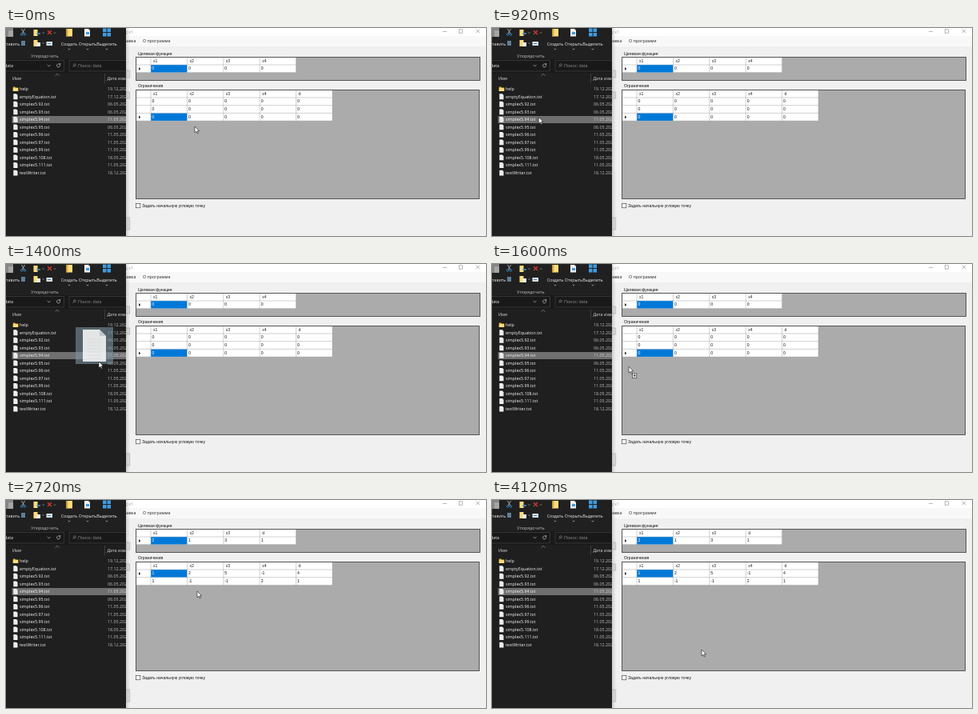
These frames come from a looping animation (600 by 260 pixels, 4360 ms). An HTML page with a canvas:

```html
<!DOCTYPE html>
<html lang="ru">
<head>
<meta charset="utf-8">
<style>
  html, body { margin: 0; width: 100%; height: 100%; overflow: hidden; background: #f0f0f0; }
  canvas { display: block; width: 600px; height: 260px; }
</style>
</head>
<body>
<canvas id="stage" width="600" height="260"></canvas>
<script>
const ctx = document.getElementById('stage').getContext('2d');
const LOOP = 4360, STEP = 40, DRAG = 1200, LOAD = 2720, EDGE = 150;
const UI = '5.3px "Open Sans", sans-serif';
const FORM = '5.15px "Liberation Sans", sans-serif';

const files = [
  ['help', '19.12.2020'], ['emptyEquation.txt', '17.12.2020'],
  ['simplex5.92.txt', '06.05.2020'], ['simplex5.93.txt', '06.05.2020'],
  ['simplex5.94.txt', '11.05.2020'], ['simplex5.95.txt', '06.05.2020'],
  ['simplex5.96.txt', '11.05.2020'], ['simplex5.97.txt', '11.05.2020'],
  ['simplex5.99.txt', '11.05.2020'], ['simplex5.108.txt', '18.05.2020'],
  ['simplex5.111.txt', '11.05.2020'], ['testWriter.txt', '18.12.2020']
];
const SELECTED = 4;

// time, x, y, eased
const cursorPath = [
  [0, 236, 123, 0], [560, 58, 110, 1], [640, 57, 109, 0], [1120, 59, 113, 1],
  [1240, 61, 115, 0], [1400, 116, 122, 0], [1720, 204, 132, 0], [2120, 239, 114, 1],
  [2720, 239, 114, 0], [3120, 265, 186, 1], [3360, 265, 186, 0], [3480, 262, 187, 0]
];

function pointAt(t) {
  const i = cursorPath.findIndex(k => k[0] > t);
  if (i < 0) return cursorPath[cursorPath.length - 1].slice(1, 3);
  const a = cursorPath[i - 1], b = cursorPath[i];
  let u = (t - a[0]) / (b[0] - a[0]);
  if (b[3]) u = u * u * (3 - 2 * u);
  return [a[1] + (b[1] - a[1]) * u, a[2] + (b[2] - a[2]) * u];
}

function box(x, y, w, h, fill, stroke, width = 0.6) {
  if (fill) { ctx.fillStyle = fill; ctx.fillRect(x, y, w, h); }
  if (stroke) { ctx.strokeStyle = stroke; ctx.lineWidth = width; ctx.strokeRect(x, y, w, h); }
}

function text(s, x, y, color, font = FORM, align = 'left') {
  ctx.font = font;
  ctx.textAlign = align;
  ctx.textBaseline = 'middle';
  ctx.fillStyle = color;
  ctx.fillText(s, x, font === UI ? y + 0.6 : y);
}

function trace(points, close) {
  ctx.beginPath();
  points.forEach(([x, y], i) => i ? ctx.lineTo(x, y) : ctx.moveTo(x, y));
  if (close) ctx.closePath();
}

function line(points, color, width = 0.6) {
  trace(points);
  ctx.strokeStyle = color;
  ctx.lineWidth = width;
  ctx.stroke();
}

function shape(points, fill) {
  trace(points, true);
  ctx.fillStyle = fill;
  ctx.fill();
}

function ring(x, y, r, color, from = 0, to = Math.PI * 2) {
  ctx.beginPath();
  ctx.arc(x, y, r, from, to);
  ctx.strokeStyle = color;
  ctx.lineWidth = 0.7;
  ctx.stroke();
}

function chevron(x, y, size, dir, color) {
  line([[x - size, y - dir * size / 2], [x, y + dir * size / 2], [x + size, y - dir * size / 2]], color, 0.7);
}

function sheet(x, y, w, h, fold, lineStep) {
  shape([[x, y], [x + w - fold, y], [x + w, y + fold], [x + w, y + h], [x, y + h]], '#f4f4f4');
  shape([[x + w - fold, y], [x + w, y + fold], [x + w - fold, y + fold]], '#bcc3c8');
  for (let ly = y + fold + lineStep; ly < y + h - 1; ly += lineStep)
    line([[x + w * 0.2, ly], [x + w * 0.8, ly]], '#c2c8cc', 0.4);
}

function folder(x, y, w, h) {
  shape([[x, y], [x + w * 0.4, y], [x + w * 0.5, y + h * 0.18], [x + w, y + h * 0.18], [x + w, y + h], [x, y + h]], '#e3ae37');
  box(x, y + h * 0.3, w, h * 0.7, '#ffdc7c');
}

function drawRibbon() {
  box(0, 0, EDGE, 39, '#202020');
  text('тавить', 0, 20, '#e8e8e8', UI);
  box(0, 0, 9, 11, '#858585');
  box(3, 3, 6, 8, '#a5a5a5');

  // scissors and shortcut
  line([[19.5, 1], [22.8, 7]], '#b9cbd8', 0.8);
  line([[23.5, 1], [20.2, 7]], '#b9cbd8', 0.8);
  ring(19.6, 8, 1.3, '#3f9be0');
  ring(23.4, 8, 1.3, '#3f9be0');
  box(19, 16, 5, 6, '#5d7f98');

  box(34.5, 2, 5, 8, '#ffdc7c');
  line([[38, 7], [43, 7]], '#3f9be0', 1.4);
  box(34.5, 15, 5, 8, '#ffdc7c');
  box(38.5, 18, 4.5, 5, '#e9eef2');
  line([[52, 3], [57, 8]], '#d63a30', 1.2);
  line([[57, 3], [52, 8]], '#d63a30', 1.2);
  box(50.5, 17, 7.5, 5, '#dfe5ea');
  line([[52, 19.5], [56, 19.5]], '#3f88c8', 1.2);
  for (const [x, y] of [[46.5, 6], [46.5, 19], [61, 6]]) chevron(x, y, 1.2, 1, '#b0b0b0');
  text('Упорядочить', 48.5, 35, '#bdbdbd', UI, 'center');

  box(75.5, 1, 7.5, 9.5, '#ffdc7c');
  box(75.5, 1, 2, 9.5, '#e3ae37');
  sheet(98, 1, 7, 9.5, 2, 2);
  box(100, 5, 4, 3, '#3f9be0');
  for (let i = 0; i < 4; i++)
    box(121 + (i % 2) * 5.5, 0.5 + (i >> 1) * 5.5, 4.5, 4.5, '#3f9be0');
  for (const [label, x] of [['Создать', 79], ['Открыть', 102], ['Выделить', 126]]) {
    text(label, x, 20, '#f0f0f0', UI, 'center');
    chevron(x, 26.5, 1.3, 1, '#c8c8c8');
  }
}

function drawAddress() {
  box(0, 39, EDGE, 17, '#191919');
  box(-2, 40.5, 74.5, 13.5, '#191919', '#484848');
  text('data', -2, 47, '#f2f2f2', UI);
  chevron(53.5, 47, 1.9, 1, '#c9c9c9');
  ring(65.5, 47, 2, '#c0c0c0', -0.3, 5.2);
  shape([[66, 44.2], [68.4, 44.4], [67.6, 46.4]], '#c0c0c0');
  box(79, 40.5, 80, 13.5, '#191919', '#484848');
  ring(85.8, 46.3, 1.4, '#909090');
  line([[84.8, 47.4], [83.4, 48.8]], '#909090');
  text('Поиск: data', 90, 47, '#8f8f8f', UI);
}

function drawExplorer() {
  ctx.save();
  ctx.beginPath();
  ctx.rect(0, 0, EDGE, 260);
  ctx.clip();
  box(0, 0, EDGE, 260, '#1f1f1f');
  drawRibbon();
  drawAddress();
  chevron(64, 58.5, 2.4, -1, '#959595');
  text('Имя', 8, 63, '#dedede', UI);
  line([[123.5, 57], [123.5, 69]], '#555', 0.6);
  text('Дата изменения', 126.5, 63, '#dedede', UI);
  files.forEach(([name, date], i) => {
    const y = 76.2 + i * 9.53;
    if (i === SELECTED) box(7.5, 110, EDGE, 9, '#6f6f6f');
    if (i) sheet(9.3, y - 3.4, 5.2, 6.8, 1.6, 1.5);
    else folder(8.8, y - 2.8, 6.4, 5.6);
    text(name, 17, y, '#f4f4f4', UI);
    text(date, 127, y, i === SELECTED ? '#d2d2d2' : '#bcbcbc', UI);
  });
  ctx.restore();
}

function drawGrid(x, y, w, h, heads, rows, active) {
  const left = x + 18.5, col = 45.4, headH = 9.5, rowH = 9.7;
  const right = left + col * heads.length, bottom = y + headH + rowH * rows.length;
  box(x, y, w, h, '#ababab');
  box(x, y, right - x, bottom - y, '#fff');
  for (let r = 0; r <= rows.length; r++) {
    const ly = y + headH + r * rowH;
    line([[x, ly], [right, ly]], '#a0a0a0', 0.5);
  }
  for (let c = 0; c <= heads.length; c++)
    line([[left + c * col, y], [left + c * col, bottom]], '#a0a0a0', 0.5);
  heads.forEach((s, c) => text(s, left + c * col + 3, y + 4.9, '#222'));
  rows.forEach((row, r) => {
    const top = y + headH + r * rowH;
    row.forEach((v, c) => {
      const on = r === active && c === 0;
      if (on) box(left + 0.2, top + 0.2, col - 0.4, rowH - 0.4, '#0078d7');
      text(v, left + c * col + 1.5, top + 5, on ? '#fff' : '#111');
    });
    if (r === active) shape([[x + 3.5, top + 3], [x + 5.7, top + 5], [x + 3.5, top + 7]], '#222');
  });
  box(x, y, w, h, null, '#555', 1);
}

function drawForm(loaded) {
  box(EDGE, 0, 450, 260, '#f0f0f0');
  box(EDGE, 0, 450, 10, '#fff');
  box(EDGE, 10, 450, 13, '#f8f8f8');
  text('g x1', 149, 4.8, '#999', UI);
  line([[546, 4.5], [551, 4.5]], '#888');
  box(566.2, 1.8, 4.4, 4.4, null, '#888');
  line([[587.5, 1.7], [592, 6.2]], '#777');
  line([[592, 1.7], [587.5, 6.2]], '#777');
  text('Справка', 162.5, 16.3, '#222', UI, 'right');
  text('О программе', 171, 16.3, '#222', UI);
  for (const [y, h] of [[53, 9], [80, 8], [237, 15]]) box(140, y, 14.8, h, '#e1e1e1', '#adadad');

  text('Целевая функция', 165, 32.3, '#111');
  text('Ограничения', 165, 72.8, '#111');
  const vars = ['x1', 'x2', 'x3', 'x4'];
  const zeros = n => Array(n).fill('0');
  const goalHeads = loaded ? ['x1', 'x2', 'x3', 'd'] : vars;
  const goal = loaded ? ['2', '1', '3', '1'] : zeros(4);
  const limits = loaded
    ? [['1', '2', '5', '-1', '4'], ['1', '-1', '-1', '2', '1']]
    : [zeros(5), zeros(5), zeros(5)];
  drawGrid(162.5, 36.5, 430, 29, goalHeads, [goal], 0);
  drawGrid(162.5, 77.5, 429, 136, [...vars, 'd'], limits, loaded ? 0 : 2);
  box(162.4, 219.4, 5.4, 5.4, '#fff', '#333');
  text('Задать начальную угловую точку', 170, 222.5, '#111');

  const shade = ctx.createLinearGradient(EDGE, 0, EDGE + 5, 0);
  shade.addColorStop(0, 'rgba(0,0,0,.14)');
  shade.addColorStop(1, 'rgba(0,0,0,0)');
  box(EDGE, 0, 5, 260, shade);
}

function drawGhost(t, x, y) {
  const fade = Math.min(1, (t - DRAG + 40) / 200);
  const gx = x - 37 + 8 * fade * fade, gy = y - 43;
  ctx.save();
  ctx.globalAlpha = 0.58;
  box(gx, gy, 47, 46, '#7d96a3');
  ctx.globalAlpha = 0.9 * fade * fade * fade;
  sheet(gx + 9, gy + 3, 29, 40, 8, 4);
  ctx.restore();
}

function drawCursor(x, y, copying) {
  ctx.save();
  ctx.translate(x, y);
  trace([[0, 0], [0, 7.9], [1.9, 6.2], [3.2, 9], [4.4, 8.5], [3.2, 5.7], [5.6, 5.6]], true);
  ctx.fillStyle = '#fff';
  ctx.fill();
  ctx.strokeStyle = '#111';
  ctx.lineWidth = 0.6;
  ctx.stroke();
  if (copying) {
    box(4.6, 8.8, 5.2, 5.2, '#fff', '#222');
    line([[5.7, 11.4], [8.7, 11.4]], '#111', 0.8);
    line([[7.2, 9.9], [7.2, 12.9]], '#111', 0.8);
  }
  ctx.restore();
}

function draw(t) {
  const [x, y] = pointAt(t);
  const dragging = t >= DRAG && t < LOAD;
  drawForm(t >= LOAD);
  drawExplorer();
  if (dragging && x < EDGE) drawGhost(t, x, y);
  drawCursor(x, y, dragging && x >= EDGE);
}

const start = performance.now();
function frame() {
  const t = (performance.now() - start) % LOOP;
  draw(Math.floor(t / STEP) * STEP);
  requestAnimationFrame(frame);
}
frame();
</script>
</body>
</html>
```
